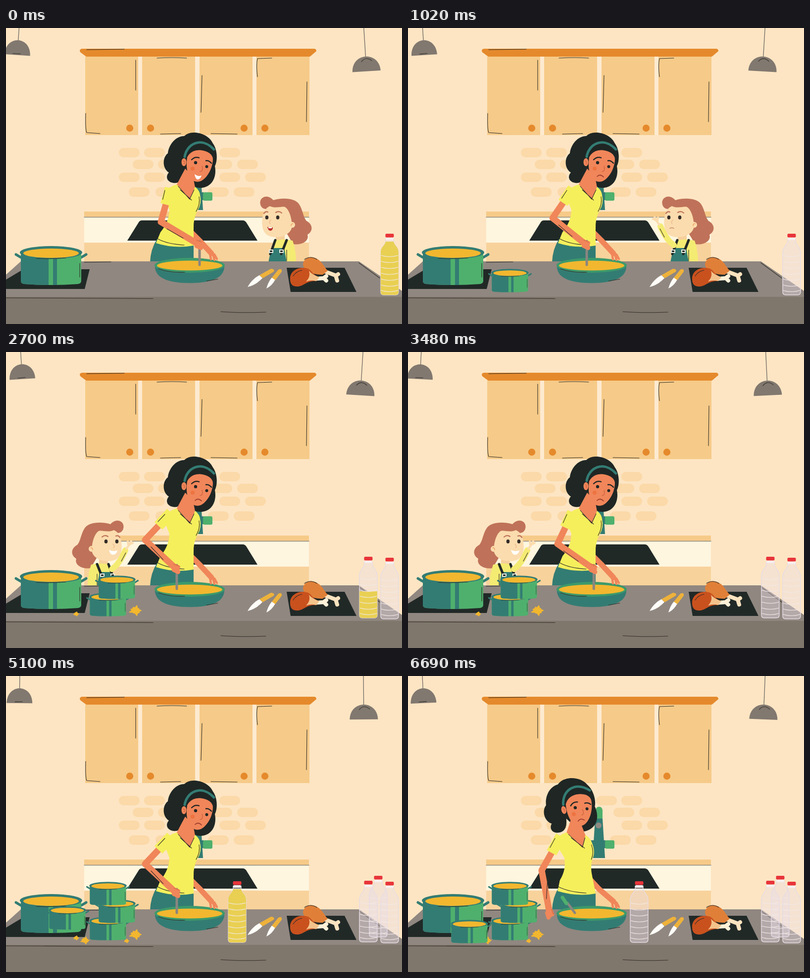
Animation of 800 by 600 pixels, one loop 6720 ms. Source, as an HTML page:

```html
<!DOCTYPE html>
<html lang="en">
<head>
<meta charset="utf-8">
<title>Busy kitchen</title>
<style>
html, body { margin: 0; width: 100%; height: 100%; overflow: hidden; background: #fde5c3; }
svg { display: block; width: 100vw; height: 100vh; }
.ink { fill: none; stroke: #333029; stroke-width: 1.1; stroke-linecap: round; }
.limb { fill: none; stroke: #f0865a; stroke-linecap: round; stroke-linejoin: round; }
</style>
</head>
<body>
<svg id="stage" viewBox="0 0 800 600"></svg>
<script>
const LOOP = 6720;
const C = {
  door: '#f6ca88', orange: '#e58a2c', dark: '#212927', teal: '#337c73', green: '#4fb06d',
  soup: '#f2b72f', skin: '#f0865a', shirt: '#f5ef5c', steel: '#8b857f', kid: '#fbdcae', hair: '#bf7259'
};
const p = (d, fill, extra = '') => `<path d="${d}" fill="${fill}" ${extra}/>`;
const ink = d => `<path class="ink" d="${d}"/>`;
const rect = (x, y, w, h, fill, r = 0) => `<rect x="${x}" y="${y}" width="${w}" height="${h}" rx="${r}" fill="${fill}"/>`;
const oval = (x, y, rx, ry, fill) => `<ellipse cx="${x}" cy="${y}" rx="${rx}" ry="${ry}" fill="${fill}"/>`;
const dot = (x, y, r, fill) => oval(x, y, r, r, fill);
const line = (d, color, w) => `<path d="${d}" fill="none" stroke="${color}" stroke-width="${w}" stroke-linecap="round" stroke-linejoin="round"/>`;
const group = (id, body) => `<g id="${id}">${body}</g>`;

const bricks = [[243, 228, 279, 380, 431], [267, 256, 307, 415, 467], [293, 228, 279, 431, 483], [323, 248, 302, 408, 460]];
const room =
  rect(0, 0, 800, 600, '#fde5c3') +
  bricks.map(([y, ...xs]) => xs.map(x => rect(x, y, 42, 19, '#fbd9a8', 9.5)).join('')).join('') +
  rect(160, 58, 453, 159, '#fdead0') +
  [160, 275, 391, 506].map(x => rect(x, 58, 107, 159, C.door)).join('') +
  [250, 292, 481, 523].map(x => dot(x, 203, 7.2, C.orange)).join('') +
  p('M154 42H622Q627 42 627 47L614 58H162L150 49Q147 43 154 42Z', C.orange) +
  ink('M163 44L239 43M262 65V126M305 61Q335 59 365 61M396 96L394 171M508 99Q505 75 508 62L537 61' +
      'M608 109L607 190M161 173Q160 205 163 212L190 214M312 215L353 214M414 214L467 215') +
  rect(158, 372, 454, 11, C.door) + rect(158, 384, 454, 52, '#fef6df') + rect(158, 435, 454, 40, '#f8d29b') +
  line('M158 383.5H612', '#8f8a82', 1.5) +
  p('M275 390H478Q483 390 486 395L508 431H245L268 394Q270 390 275 390Z', C.dark) +
  p('M379 300V272Q380 265 386 265Q392 265 393 272V300Z', C.green) +
  p('M378 289H393L398 369H373Z', C.teal) + dot(385, 303, 6, '#8f8a82') +
  rect(368, 333, 32, 16, C.teal, 2) + rect(398, 333, 19, 17, C.green, 3);

const lamp = (x, y, r, hook) =>
  line(`M${x} -30V${y - 27}`, '#6f6963', 1.3) +
  p(`M${x - r} ${y}C${x - r + 1} ${y - 40} ${x + r - 1} ${y - 40} ${x + r} ${y}Z`, '#81786f') + ink(hook);

const counter =
  p('M30 473H713L800 533V546H0V500Z', '#908780') + rect(0, 545, 800, 55, '#7f766c') +
  ink('M158 475L212 474M713 476L755 507M0 547L297 548.5M434 575Q470 578 525 576') +
  p('M35 489H169L159 529H-5V513Z', C.dark);

const pot =
  line('M-61 10L-71 4M61 10L71 4', C.teal, 5) +
  p('M-61 0V58Q-61 63 -54 64Q0 68 54 64Q61 63 61 58V0Z', C.green) +
  p('M-61 0H-5V66Q-30 66 -54 64Q-61 63 -61 58Z', C.teal) + rect(4, 8, 8, 58, C.teal) +
  oval(0, 0, 63, 13, C.teal) + oval(0, 1.5, 56, 9.5, C.soup) +
  ink('M-30 12Q0 14 30 11M58 22V50');

const pan =
  p('M301 480C299 506 326 517 371 517C416 517 443 506 441 480Z', C.teal) +
  oval(371, 481, 71, 15, '#3d9a6b') + oval(371, 481.5, 66, 10, C.soup) +
  ink('M308 488Q330 496 361 495M405 513L428 509');

const food =
  p('M488 525Q497 509 512 501L518 507Q505 521 488 525Z', '#fffdf8') +
  p('M512 501L535 488Q544 488 541 494L519 507Z', '#eeb23b') +
  p('M526 528Q530 514 537 506L544 510Q537 523 526 528Z', '#fffdf8') +
  p('M537 506L550 490Q558 486 557 494L544 511Z', '#eeb23b') +
  p('M567 486H684L708 535H575Z', C.dark) +
  line('M635 490L667 502M668 501L671 499M667 505L669 512', '#fbe3bf', 8) +
  p('M600 478C603 463 620 460 633 471C640 477 645 487 650 492L640 500C622 500 600 495 600 478Z', '#e08038') +
  line('M615 509L643 507M643 506L647 503M644 509L647 512', '#fff1d8', 8) +
  p('M574 509C573 492 592 483 607 487C619 490 616 498 632 505L626 513C606 512 602 524 588 524C578 524 574 518 574 509Z', '#c9511e') +
  p('M612 492Q618 500 633 505L627 513Q616 510 606 514Q616 504 612 492Z', '#f3c38b') +
  ink('M580 503Q586 493 598 491M603 469Q615 461 628 469');

const bottleShape = 'M-8 10V16C-10 25 -18 26 -18 38V118Q-18 124 -12 124H12Q18 124 18 118V38C18 26 10 25 8 16V10Z';
const bottle = ([x, y], i) => `<g id="bottle${i}" transform="translate(${x} ${y})">` +
  p(bottleShape, '#e8dde5', 'fill-opacity=".4" stroke="#e6dce4" stroke-width="1.4"') +
  `<g clip-path="url(#bottleClip)"><rect id="oil${i}" x="-18" width="36" height="124" fill="#e9d053"/></g>` +
  [44, 56, 68, 80, 92, 104, 115].map(v => line(`M-17 ${v}Q0 ${v + 5} 17 ${v}`, '#f3e9e6', 1.2)).join('') +
  rect(-8, 8, 16, 5, '#f7eeee', 2) + rect(-8.5, 0, 17, 7.5, '#e8343a', 2) + '</g>';

function splat(x, y, r) {
  let d = '';
  for (let i = 0; i < 18; i++) {
    const a = i * Math.PI / 9, k = i % 2 ? .6 : .9 + .25 * Math.sin(i * 5);
    d += `${i ? 'L' : 'M'}${x + Math.cos(a) * r * k * 1.2} ${y + Math.sin(a) * r * k * .9}`;
  }
  return p(d + 'Z', C.soup, `stroke="${C.soup}" stroke-width="2" stroke-linejoin="round"`);
}

const girl =
  p('M540 349C528 335 510 343 514 358C517 369 530 369 535 362L580 438C600 441 613 430 609 419C622 411 619 397 607 391C600 383 600 369 592 357C584 345 560 343 540 349Z', C.hair) +
  rect(545, 412, 18, 25, '#f6cf9b') +
  p('M541 431Q560 426 579 431Q586 450 586 475H533Z', '#f4eb72') +
  p('M536 446H562L567 475H530Z', C.teal) +
  line('M544 430L534 458M567 430L556 458', C.dark, 5) +
  rect(531, 449, 9, 7, '#e8ece0') + rect(552, 449, 9, 7, '#e8ece0') + rect(533, 451, 5, 3, C.dark) + rect(554, 451, 5, 3, C.dark) +
  ink('M567 450V472') +
  p('M533 361C545 367 559 360 564 363C574 370 579 392 577 406C571 424 543 428 528 420C518 413 516 399 518 386C519 374 523 366 533 361Z', C.kid) +
  dot(578, 399, 6, C.kid) + line('M576 401Q576 396 580 397', '#eda15f', 1.5) +
  line('M521 376Q524 371 529 373M545 374Q551 370 557 375', C.hair, 2.2) +
  oval(527, 384, 3.3, 4, '#332b28') + oval(549, 384, 3.3, 4, '#332b28') +
  line('M535 389Q530 395 534 397', '#ecb98a', 1.3) +
  group('talk', p('M528 403Q534 406 539 404Q539 411 534 411Q529 410 528 403Z', '#b8322c') + rect(530, 404, 7, 2, '#fff')) +
  group('pout', line('M529 406Q533 404 537 406', '#c98a6a', 1.4)) +
  group('grin', p('M526 402Q534 406 543 401Q541 411 534 411Q527 409 526 402Z', '#fff')) +
  group('reach', line('M537 440Q522 430 510 402', '#f4eb72', 12) +
    line('M508 399L502 391M503 391L495 387M502 390L498 383M504 391L505 384', C.kid, 4) + ink('M518 424L509 407'));

const hair =
  p('M378 212C394 211 412 220 418 234C427 246 428 268 422 280C426 300 418 322 395 324C382 325 374 318 373 310L360 290' +
    'C358 305 352 316 338 314C324 312 322 300 329 293C315 284 316 262 327 254C329 236 343 219 360 219Q368 212 378 212Z', '#1f2624');
const face =
  p('M366 262C372 250 384 246 396 248C408 250 417 256 418 265C418 280 410 300 396 309C388 314 378 312 372 304C366 296 363 280 366 262Z', C.skin) +
  oval(359.5, 272, 5, 8, C.skin) + line('M358 269Q362 271 360 276', '#cf6440', 1.2) +
  p('M362 266C366 250 385 238 420 256L418 240Q385 220 362 250Z', '#1f2624') +
  line('M361 261C365 235 394 219 420 246', C.teal, 5) +
  line('M375 267Q382 260 390 263M404 269Q410 268 415 274', '#1f2624', 2.4) +
  dot(383, 273, 3.2, '#1f2624') + dot(405.5, 281, 3, '#1f2624') + dot(377, 285, 4, '#ee7340') +
  line('M396 280Q399 290 392 291', '#cf6440', 1.3) +
  group('smile', p('M381 296Q388 302 395 299Q392 308 386 307Q382 304 381 296Z', '#fff')) +
  group('frown', line('M382 301Q388 295 395 302', '#9c3d2c', 1.7));
const torso =
  p('M362 285L344 319L371 350L382 323L378 302Z', C.skin) +
  p('M345 317L371 348L382 322Q391 329 392 338Q396 356 387 370Q378 386 379 408V441Q340 448 303 436L312 414Q330 392 330 368L318 338Q326 322 345 317Z', C.shirt) +
  ink('M348 321L371 347L380 328M390 342Q393 357 384 372M306 427Q325 438 360 440M352 328L375 349');

const bottleSpots = [[752, 405], [732, 415], [775, 417], [467, 416]];
const stage = document.getElementById('stage');
stage.innerHTML =
  `<clipPath id="bottleClip"><path d="${bottleShape}"/></clipPath>` + room +
  group('lampL', lamp(28, 55, 26, 'M19 52.5L34 52')) +
  group('lampR', lamp(722, 88, 28.5, 'M713 68Q722 57 734 67')) +
  group('girl', girl) + group('held', pot) +
  p('M305 428L379 438V475H291Q292 448 305 428Z', C.teal) + counter +
  group('splatA', splat(262, 524, 10) + splat(142, 531, 4)) + group('splatB', splat(160, 536, 7) + splat(244, 537, 3.5)) +
  `<g transform="translate(91 455)">${pot}</g>` +
  [0, 1, 2, 3].map(i => group('pot' + i, pot)).join('') + pan + food +
  bottleSpots.map(bottle).join('') +
  group('hair', hair) +
  '<path id="sideArm" class="limb" stroke-width="11"/>' + line('M412 456L414 469M418 458L421 470M421 459L426 468', C.skin, 4.5) +
  group('torso', torso) + group('face', face) +
  group('rest', line('M322 460L337 480', C.steel, 5) + line('M312 449L320 461', C.green, 7)) +
  '<path id="arm" class="limb" stroke-width="13"/>' +
  `<path id="sleeve" fill="none" stroke="${C.shirt}" stroke-width="22"/><path id="crease" class="ink"/>` +
  group('spoon', line('M0 432V480', C.steel, 5)) +
  group('hand', line('M-6 -3L5 3M-3 4L6 8M-5 -6L6 -2', C.skin, 8) + line('M-3 -8L7 -4', '#cf6440', 1));

const el = {};
stage.querySelectorAll('[id]').forEach(e => el[e.id] = e);
const set = (id, value, name = 'transform') => el[id].setAttribute(name, value);
const show = (id, on) => el[id].style.display = on ? '' : 'none';
const ramp = (t, a, b) => Math.min(1, Math.max(0, (t - a) / (b - a)));
const ease = (t, a, b) => { const u = ramp(t, a, b); return u * u * (3 - 2 * u); };
const mix = (a, b, u) => a + (b - a) * u;

// time, x shift, y shift, reach
const girlKeys = [
  [0, 0, 0, 0], [500, 0, 0, 0], [850, 0, 0, 1], [1150, 0, 0, 1], [1400, 10, 140, 1],
  [1450, 0, 140, 0], [1800, 0, 0, 0], [2300, 0, 0, 0], [2650, 0, 0, 1], [3550, 0, 0, 1], [3800, -10, 140, 1],
  [3950, 40, 140, 1], [4280, 28, 15, 1], [4650, 28, 15, 1], [4900, 40, 140, 1],
  [5050, -28, 140, 1], [5400, -28, 3, 1], [5900, -28, 3, 1], [6150, -35, 140, 1], [LOOP, -35, 140, 1]
];
// x, final y, start y, landing start, landing end
const potKeys = [[206, 496, 470, 650, 850], [224, 461, 392, 2050, 2280], [206, 425, 380, 3780, 3980], [124, 502, 465, 5000, 5200]];
// appears, starts draining, drained
const oilKeys = [[3700, 3800, 4250], [1600, 2200, 3200], [0, 150, 900], [5000, 5150, 5600]];

function draw(t) {
  const swing = Math.cos(t / 1840 * 2 * Math.PI);
  set('lampL', `rotate(${3.8 * swing} 28 -24)`);
  set('lampR', `rotate(${-3.6 * swing} 722 -13)`);

  const i = girlKeys.findIndex(k => k[0] > t), a = girlKeys[i - 1], b = girlKeys[i];
  const u = ease(t, a[0], b[0]);
  const [gx, gy, reach] = [1, 2, 3].map(n => mix(a[n], b[n], u));
  const left = t > 1420 && t < 3900 || t > 5000;
  set('girl', `translate(${gx + (left ? 751 : 0)} ${gy}) scale(${left ? -1 : 1} 1)`);
  set('reach', `rotate(${-130 * (1 - reach)} 537 440)`);
  show('reach', reach > .05);
  const mood = t > 800 && t < 2200 ? 'pout' : t >= 2200 && t < 3900 ? 'grin' : 'talk';
  ['talk', 'pout', 'grin'].forEach(m => show(m, m === mood));
  set('held', `translate(224 ${392 + gy}) scale(.6)`);
  show('held', t > 1450 && t < 2000);

  potKeys.forEach(([x, y, from, start, end], n) => {
    set('pot' + n, `translate(${x} ${mix(from, y, ramp(t, start, end) ** 2)}) scale(.6)`);
    show('pot' + n, t >= (n === 1 ? 2000 : start));
  });
  show('splatA', t > 2280);
  show('splatB', t > 3980);
  oilKeys.forEach(([from, start, end], n) => {
    show('bottle' + n, t >= from);
    set('oil' + n, mix(16, 124, ramp(t, start, end)), 'y');
  });

  const turn = ease(t, 6100, 6400), stir = Math.cos(t / 600 * 2 * Math.PI);
  const sx = 368 + 23 * stir;
  const head = `translate(${mix(394.5, 350, turn)} ${mix(277, 268, turn)}) rotate(${-14 * turn}) translate(-394.5 -277)`;
  set('hair', head);
  set('face', head);
  set('torso', `matrix(1 0 ${.2 * turn} 1 ${-88 * turn} 0)`);
  show('smile', t < 700);
  show('frown', t >= 700);

  const sh = [mix(331, 307, turn), 328];
  const elbow = [mix(297 + 16 * stir, 270, turn), mix(387 + 6 * stir, 394, turn)];
  const hand = [mix(sx - 3, 286, turn), mix(438, 480, turn)];
  const along = k => `${mix(sh[0], elbow[0], k)} ${mix(sh[1], elbow[1], k)}`;
  set('arm', `M${along(.25)}L${elbow}L${hand}`, 'd');
  set('sleeve', `M${along(-.05)}L${along(.46)}`, 'd');
  set('crease', `M${sh[0] - 10} ${sh[1] + 1}L${mix(sh[0], elbow[0], .3) - 9} ${mix(sh[1], elbow[1], .3)}` +
    `M${elbow[0] + 12} ${elbow[1] + 14}L${mix(elbow[0], hand[0], .6)} ${mix(elbow[1], hand[1], .6) + 6}`, 'd');
  set('sideArm', `M${mix(373, 362, turn)} ${mix(413, 406, turn)}L${mix(392, 386, turn)} 432L415 457`, 'd');
  set('hand', `translate(${hand}) rotate(${50 * turn})`);
  set('spoon', `translate(${sx} 0)`);
  show('spoon', turn < .15);
  show('rest', turn >= .15);
}

const start = performance.now();
function frame() {
  draw((performance.now() - start) % LOOP);
  requestAnimationFrame(frame);
}
draw(0);
requestAnimationFrame(frame);
</script>
</body>
</html>
```
